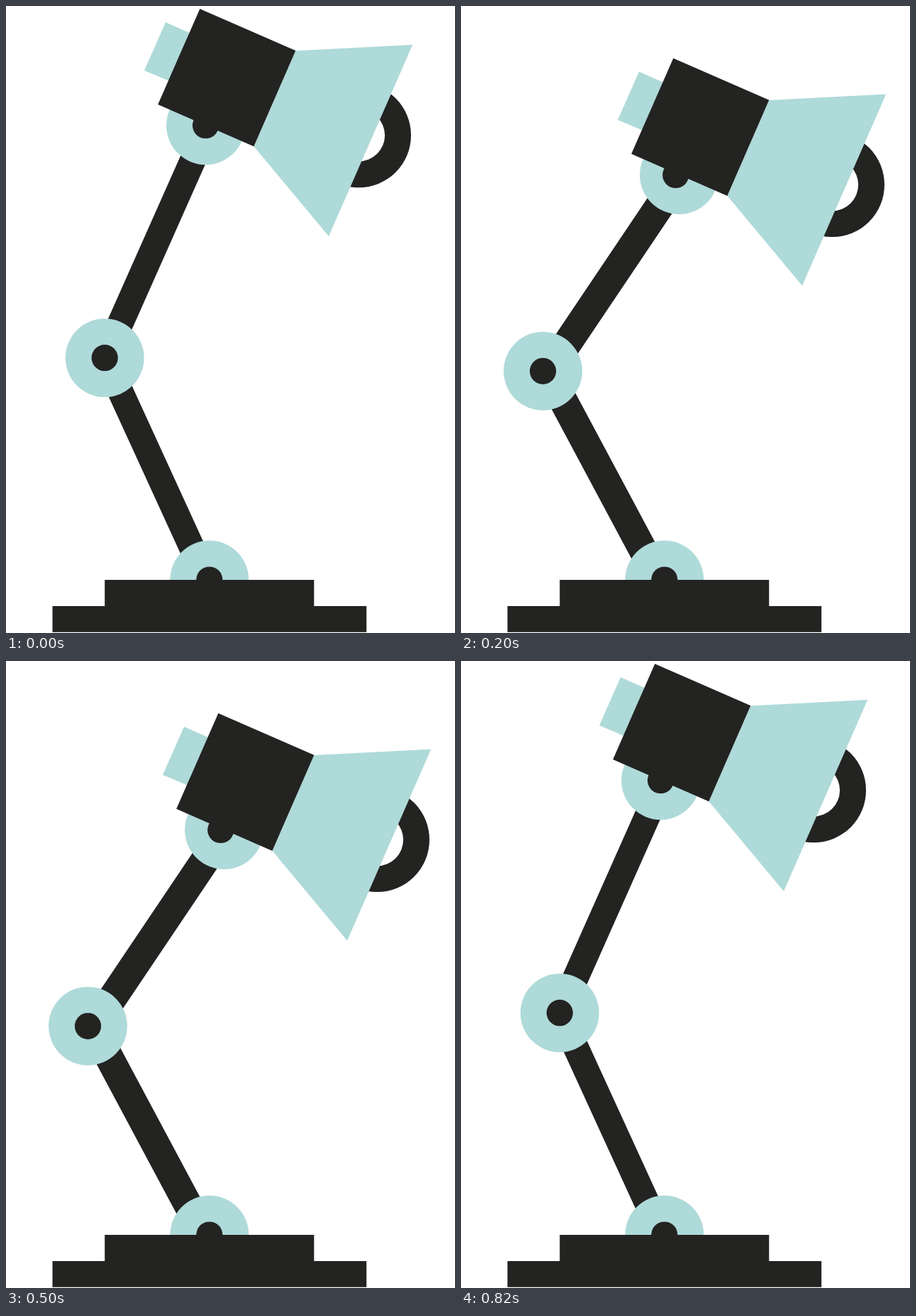
These frames come from a looping animation (633x885 px, 0.9 s). An HTML page with a canvas:

```html
<!DOCTYPE html>
<html lang="en">
<head>
<meta charset="utf-8">
<title>Desk lamp</title>
<style>
html, body { margin: 0; width: 100%; height: 100%; overflow: hidden; background: #fff; }
canvas { display: block; }
</style>
</head>
<body>
<canvas id="stage" width="633" height="885"></canvas>
<script>
const ctx = document.getElementById('stage').getContext('2d');
const DARK = '#232322', TEAL = '#aedad9', WHITE = '#fff';
const JOINT = 55.4, PIN = 18.6;

// head: offset; pin: upper pin centre; arms: x1, y1, x2, y2, width
const poses = [
  { head: [0, 0], pin: [281.5, 168.5], knee: [139.2, 496.7], kneePin: 0,
    upper: [263.5, 217.5, 160.7, 449, 36.8], lower: [161.5, 544.5, 262, 764.2, 36.3] },
  { head: [26, 36], pin: [305, 209], knee: [139.2, 496.7], kneePin: 0,
    upper: [278.7, 247.7, 166.2, 452.2, 38.2], lower: [161.5, 544.5, 262, 764.2, 36.3] },
  { head: [26, 69.8], pin: [302.7, 238.5], knee: [115.5, 515.3], kneePin: 0,
    upper: [280.2, 282, 149.2, 477, 40.9], lower: [144.7, 558, 257, 768.5, 40.3] },
  { head: [50.4, 121], pin: [328.5, 292.7], knee: [97, 533.6], kneePin: 3.4,
    upper: [299.2, 327.7, 134.2, 500.2, 44.8], lower: [130.2, 573, 253, 773, 42.5] }
];
const STEP = 100;
const order = [0, 1, 2, 3, 3, 2, 1, 0, 0];

function disc(x, y, r, color) {
  ctx.fillStyle = color;
  ctx.beginPath();
  ctx.arc(x, y, r, 0, Math.PI * 2);
  ctx.fill();
}

function poly(color, ...pts) {
  ctx.fillStyle = color;
  ctx.beginPath();
  pts.forEach(([x, y]) => ctx.lineTo(x, y));
  ctx.fill();
}

// The ends run a little further, hidden under the joints
function arm([x1, y1, x2, y2, width]) {
  const k = 25 / Math.hypot(x2 - x1, y2 - y1);
  const dx = (x2 - x1) * k, dy = (y2 - y1) * k;
  ctx.strokeStyle = DARK;
  ctx.lineWidth = width;
  ctx.beginPath();
  ctx.moveTo(x1 - dx, y1 - dy);
  ctx.lineTo(x2 + dx, y2 + dy);
  ctx.stroke();
}

function drawHead([dx, dy], [px, py]) {
  ctx.save();
  ctx.translate(dx, dy);
  disc(497.2, 182.5, 73.8, DARK);
  disc(497.2, 182.5, 36.9, WHITE);
  disc(281.5, 168.7, JOINT, TEAL);
  poly(TEAL, [225, 23], [275, 45], [246, 112.5], [195, 91]);
  poly(TEAL, [408, 63.2], [573.2, 54.7], [455, 325], [349.5, 198.2]);
  poly(DARK, [273.3, 4], [408.3, 63], [349.4, 198.3], [214.2, 139]);
  ctx.restore();
  disc(px, py, PIN, DARK);
}

function drawBase() {
  disc(286.8, 810, JOINT, TEAL);
  disc(286.8, 810, PIN, DARK);
  ctx.fillStyle = DARK;
  ctx.fillRect(139.2, 810, 295.1, 38);
  ctx.fillRect(65.5, 847, 442.7, 36.8);
}

function draw(p) {
  ctx.fillStyle = WHITE;
  ctx.fillRect(0, 0, 633, 885);
  arm(p.lower);
  arm(p.upper);
  const [kx, ky] = p.knee;
  disc(kx, ky, JOINT, TEAL);
  disc(kx + p.kneePin, ky, PIN, DARK);
  drawHead(p.head, p.pin);
  drawBase();
}

const start = performance.now();
function tick() {
  const step = Math.floor((performance.now() - start) / STEP) % order.length;
  draw(poses[order[step]]);
  requestAnimationFrame(tick);
}
tick();
</script>
</body>
</html>
```
